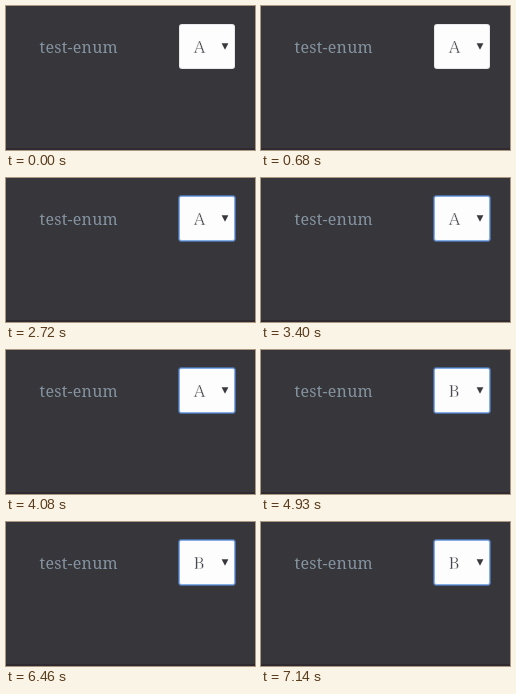
An HTML page that plays this animation: 249 px wide and 144 px high, repeating every 7310 ms.

```html
<!DOCTYPE html>
<html lang="en">
<head>
<meta charset="utf-8">
<title>Enum select</title>
<style>
  html, body { margin: 0; width: 100%; height: 100%; overflow: hidden; background: #37363b; }
  svg { display: block; width: 249px; height: 144px; }
  text { font-family: "Roboto Slab", "Noto Serif", serif; font-weight: 300; }
  .label { font-size: 16px; letter-spacing: 0.25px; font-weight: 400; fill: #84939f; }
  .value { font-size: 17px; fill: #45464b; stroke: #fdfdfe; stroke-width: 0.5px; text-anchor: middle; }
</style>
</head>
<body>
<svg viewBox="0 0 249 144">
  <rect width="249" height="144" fill="#37363b"/>
  <rect y="142" width="249" height="2" fill="#2f2a30"/>
  <text class="label" x="33.5" y="47">test-enum</text>
  <rect x="173" y="18" width="56" height="45" rx="3" fill="#e8e8ec"/>
  <rect x="174" y="19" width="54" height="43" rx="2" fill="#fdfdfe"/>
  <g id="focus" fill="none" opacity="0">
    <rect x="172.5" y="17.5" width="57" height="46" rx="2.5" stroke="#4a6a9c"/>
    <rect x="173.5" y="18.5" width="55" height="44" rx="1.5" stroke="#86aee6"/>
  </g>
  <text class="value" id="first" x="193.5" y="47">A</text>
  <text class="value" id="second" x="193" y="47" opacity="0">B</text>
  <path d="M215.6 37.2h6.8l-3.4 6.6z" fill="#3a3a3e"/>
</svg>
<script>
  const LOOP = 7310;
  const FOCUS = 2040;
  const CHOOSE = 4930;

  // Hard switch of opacity at one moment of the loop
  function flip(id, at, from, to) {
    const offset = at / LOOP;
    document.getElementById(id).animate([
      { opacity: from, offset: 0 },
      { opacity: from, offset },
      { opacity: to, offset },
      { opacity: to, offset: 1 }
    ], { duration: LOOP, iterations: Infinity }).startTime = 0;
  }

  flip("focus", FOCUS, 0, 1);
  flip("first", CHOOSE, 1, 0);
  flip("second", CHOOSE, 0, 1);
</script>
</body>
</html>
```
